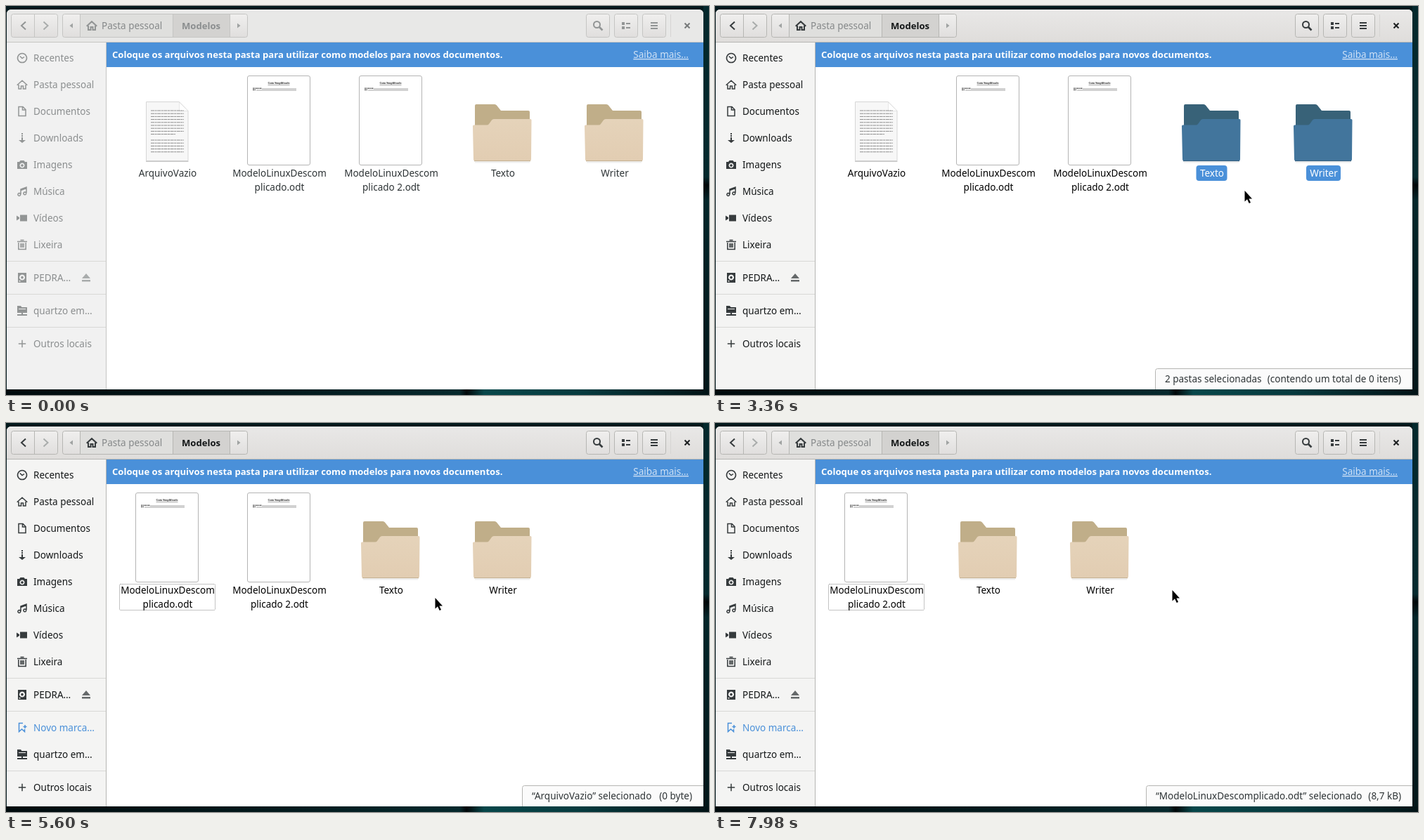
An HTML page for the animation above (8 s loop, 1000 by 554 pixels).

```html
<!DOCTYPE html>
<html lang="pt-BR">
<head>
<meta charset="utf-8">
<title>Modelos</title>
<style>
  html, body { margin: 0; width: 100%; height: 100%; overflow: hidden; background: #021518; }
  svg { display: block; width: 1000px; height: 554px; font: 13.5px "Noto Sans", "Open Sans", sans-serif; }
  text { white-space: pre; }
  .bold { font-weight: 700; font-size: 13.1px; }
  .mid { text-anchor: middle; }
  .end { text-anchor: end; }
  .ink { fill: var(--ink); }
  .glyph { fill: var(--glyph); }
  .line { fill: none; stroke: var(--glyph); stroke-width: 2; }
  .box { fill: url(#button); stroke: var(--edge); }
  .rule { fill: #d8d8d6; }
  .tiny { font: 700 4px "Liberation Serif", serif; text-decoration: underline; }
  .new { --ink: #4a90d9; --glyph: #4a90d9; }
  .off { --ink: #929595; --glyph: #a5a8a8; }
</style>
</head>
<body>
<svg viewBox="0 0 1000 554">
  <defs>
    <linearGradient id="button" x2="0" y2="1">
      <stop stop-color="#f0efee"/><stop offset="1" stop-color="#e0dedd"/>
    </linearGradient>
    <linearGradient id="head" x2="0" y2="1">
      <stop stop-color="#e9e8e7"/><stop offset="1" stop-color="#dfdddb"/>
    </linearGradient>
    <linearGradient id="floor">
      <stop stop-color="#010b0d"/><stop offset=".4" stop-color="#031a1d"/>
      <stop offset=".645" stop-color="#06292d"/><stop offset=".655" stop-color="#010709"/>
      <stop offset=".68" stop-color="#07474a"/><stop offset=".82" stop-color="#063a3e"/>
      <stop offset="1" stop-color="#021316"/>
    </linearGradient>
    <linearGradient id="wall" x2="0" y2="1">
      <stop stop-color="#03282c"/><stop offset=".44" stop-color="#042a2e"/>
      <stop offset=".46" stop-color="#000608"/><stop offset=".5" stop-color="#03262a"/>
      <stop offset="1" stop-color="#021619"/>
    </linearGradient>
    <linearGradient id="front" x2="0" y2="1">
      <stop stop-color="#e5d3ba"/><stop offset="1" stop-color="#e2cdb2"/>
    </linearGradient>
  </defs>
  <rect width="1000" height="554" fill="#02191c"/>
  <rect x="992" width="8" height="554" fill="url(#wall)"/>
  <rect y="546" width="1000" height="8" fill="url(#floor)"/>
  <path d="M1 546V12q0-7 7-7H985q7 0 7 7V546Z" fill="#fff"/>
  <path d="M1 51V12q0-7 7-7H985q7 0 7 7V51Z" fill="#e8e8e7"/>
  <path id="lit" d="M1 51V12q0-7 7-7H985q7 0 7 7V51Z" fill="url(#head)"/>
  <rect x="1" y="51" width="991" height="1" fill="var(--edge)"/>
  <g id="header"></g>
  <rect x="1" y="52" width="141" height="494" fill="var(--side)"/>
  <rect x="142" y="52" width="1" height="494" fill="var(--edge)"/>
  <rect x="143" y="52" width="849" height="35" fill="#4a90d9"/>
  <text x="151" y="74" class="bold" fill="#fff">Coloque os arquivos nesta pasta para utilizar como modelos para novos documentos.</text>
  <text x="971" y="74" class="end" fill="#cfe1f5" text-decoration="underline">Saiba mais…</text>
  <g id="side"></g>
  <g id="view"></g>
</svg>
<script>
const $ = id => document.getElementById(id);
const root = document.documentElement.style;
const LOOP = 8000, BLUE = '#4a90d9';

// 16 x 16 symbolic icons: f = filled, s = stroked
const icons = {
  recent: { s: 'M8 1.5a6.5 6.5 0 1 0 .01 0ZM4.8 5.5 8 8.5 11 6.5' },
  home: { s: 'M.7 8.7 8 2.2l7.3 6.5M3 8v6h3.5v-4h3v4H13V8' },
  doc: { s: 'M3 1.5h6l4 4v9H3ZM8.5 2v4H13' },
  down: { f: 'M7 1h2v2H7ZM7 4h2v2H7ZM7 7h2v4h4l-5 4-5-4h4Z' },
  photo: { f: 'M1 4h3l1.5-2h5L12 4h3v10H1ZM8 5.5a3.5 3.5 0 1 0 .01 0ZM8 7.2a1.8 1.8 0 1 1-.01 0Z' },
  music: { s: 'M6 12V5l8-3v8M6 6.5l8-3M3.8 10.6a1.9 1.9 0 1 0 .01 0ZM11.8 9a1.9 1.9 0 1 0 .01 0Z' },
  video: { f: 'M5 3.5h10v9H5ZM0 4.5 4 7v2l-4 2.5Z' },
  trash: { s: 'M2.8 5v9.5h10.4V5M1 3.6h14M5.5 1.5h5M6 6v6M8 6v6M10 6v6' },
  disk: { f: 'M2 1h12v14H2ZM8 3.5a4 4 0 1 0 .01 0ZM8 5.8a1.8 1.8 0 1 1-.01 0ZM3.5 12v1.5h2V12Z' },
  net: { f: 'M1 1h5l1.5 2H15v8H1ZM3 5v1h10V5ZM7 11h2v2h6v2H1v-2h6Z' },
  plus: { s: 'M8 2.8v10.4M2.8 8h10.4' },
  mark: { s: 'M9 1.5H3.5v12L7.5 10l4 3.5V10M12 4v5M9.5 6.5h5' },
  eject: { f: 'M8 2 14 9H2ZM2 11h12v2.5H2Z' }
};
function icon(name, x, y, thin) {
  const { f, s } = icons[name];
  return `<g transform="translate(${x} ${y})">` + (f
    ? `<path class="glyph" fill-rule="evenodd" d="${f}"/>`
    : `<path class="line" ${thin ? 'style="stroke-width:1.5"' : ''} d="${s}"/>`) + '</g>';
}

const button = (x, w = 34) => `<rect class="box" x="${x + .5}" y="11.5" width="${w - 1}" height="33" rx="3"/>`;
const bar = x => `<rect x="${x}" y="12" width="1" height="33" fill="var(--edge)"/>`;
$('header').innerHTML =
  button(7, 67) + bar(40) + button(80, 264) +
  '<rect x="106" y="12" width="131" height="32" fill="#dfdfdd"/>' +
  '<rect x="238" y="12" width="80" height="32" fill="#d3d2d0"/>' +
  bar(105) + bar(237) + bar(318) +
  '<path class="line" d="M28 22.5 22 28l6 5.5"/>' +
  '<path d="M53.5 22.5 59.5 28l-6 5.5" fill="none" stroke="#a9acab" stroke-width="2"/>' +
  '<path d="M95 24.5v7L90.5 28ZM329 24.5v7l4.5-3.5Z" fill="#a0a3a2"/>' +
  icon('home', 114, 20) +
  '<text x="136" y="33" fill="#858889">Pasta pessoal</text>' +
  '<text x="250" y="33" class="bold ink">Modelos</text>' +
  [825, 865, 905].map(x => button(x)).join('') +
  '<circle class="line" cx="840.5" cy="26.5" r="4.5"/><path class="line" style="stroke-width:2.6" d="m844 30 4.5 4.5"/>' +
  '<path class="glyph" d="M876 23h4v4h-4ZM876 29h4v4h-4ZM882 24h6v2h-6ZM882 30h6v2h-6ZM917 23h10v2h-10ZM917 27h10v2h-10ZM917 31h10v2h-10Z"/>' +
  '<rect x="945" y="12" width="1" height="32" fill="#d6d5d3"/>' +
  '<path d="m965.5 24.5 7 7m0-7-7 7" fill="none" stroke="var(--close)" stroke-width="2"/>';

const places = [['recent', 'Recentes'], ['home', 'Pasta pessoal'], ['doc', 'Documentos'], ['down', 'Downloads'],
  ['photo', 'Imagens'], ['music', 'Música'], ['video', 'Vídeos'], ['trash', 'Lixeira']];
const row = ([pic, label], y, kind = '') =>
  `<g class="${kind}">${icon(pic, 15, y - 8, true)}<text class="ink" x="39" y="${y + 5}">${label}</text></g>`;
const rule = y => `<rect class="rule" x="1" y="${y}" width="141" height="1"/>`;
function sidebar(dragging, marked) {
  const d = marked ? 38 : 0;
  return places.map((p, i) => row(p, 74 + 38 * i, dragging && !i ? 'off' : '')).join('') +
    rule(363) + row(['disk', 'PEDRA…'], 387) + `<g opacity=".75">${icon('eject', 106, 379)}</g>` + rule(410) +
    (marked ? row(['mark', 'Novo marca…'], 434, 'new') : '') +
    row(['net', 'quartzo em…'], 434 + d) + rule(457 + d) + row(['plus', 'Outros locais'], 481 + d);
}

// Pictures are drawn in the first slot and moved from there
function note(sel, hot) {
  let rows = '';
  for (let y = 149; y < 210; y += 4.2)
    if (Math.abs(y - 186.8) > 1) rows += `M206 ${y}h${y > 180 && y < 185 ? 35 : 47}`;
  return `<path d="M199.5 136.5h47l12.5 13v71h-59.5Z" fill="${sel ? BLUE : hot ? '#fff' : '#f7f7f7'}" stroke="${sel ? '#3d78b5' : hot ? '#e9e9e9' : '#d6d6d6'}"/>
    <path d="M199 221.3h60.5" stroke="${hot ? '#ddd' : '#bbb'}"/>
    <path d="M246.5 137v12.5H259Z" fill="${sel ? '#78aee5' : '#fff'}" stroke="${hot ? '#eee' : '#ddd'}" stroke-width=".7"/>
    <path d="${rows}" stroke="${sel ? '#2d5782' : hot ? '#e6e6e6' : '#8d8d8d'}" stroke-dasharray="5 .6 3 .6" stroke-width="${hot ? .8 : 1}" fill="none"/>`;
}
function sheet(sel) {
  const dark = sel ? '#15304b' : '#222';
  return `<rect x="184.5" y="99.5" width="89" height="127" rx="2.5" fill="${sel ? BLUE : '#fff'}" stroke="${sel ? '#3a74b0' : '#b4b4b4'}"/>
    <text class="tiny mid" x="229" y="111" fill="${dark}">Guia Simplificado</text>
    <path d="M192 117.2h13M192 119.4h4" stroke="${dark}" stroke-width="1" stroke-dasharray="2 .5"/>
    <path d="M205 118h49M197 120h57" stroke="${dark}" stroke-width=".6" opacity=".7"/>`;
}
function folder(sel, hot) {
  return `<path d="M190 170v-28q0-2 2-2h26q2 0 3 1.5l6 7.5h39q2 0 2 2v20Z" fill="${sel ? '#386278' : hot ? '#cbb994' : '#c0ae89'}"/>
    <path d="M187 171q0-1.5 1.5-1.5H207q2 0 3-1.5l4-5.5q1-1.5 3-1.5h52q1.500 0 1.500 1.500l-.5 56q0 2-2 2H190q-2 0-2-2Z" fill="${sel ? '#42759c' : 'url(#front)'}"/>
    <path d="M189 220.600h80" stroke="${sel ? '#365f80' : '#c5b293'}" stroke-width="1.200"/><path d="M190 222.500h78" stroke="#eee" stroke-width="2"/>`;
}
const files = {
  empty: { draw: note, lines: ['ArquivoVazio'], half: 46 },
  one: { draw: sheet, lines: ['ModeloLinuxDescom', 'plicado.odt'], half: 70.5 },
  two: { draw: sheet, lines: ['ModeloLinuxDescom', 'plicado 2.odt'], half: 70.5 },
  text: { draw: folder, lines: ['Texto'], half: 22 },
  writer: { draw: folder, lines: ['Writer'], half: 24.5 }
};
function item(id, x, y, { sel, hot, focus, ink = '#000' }) {
  const { draw, lines, half } = files[id], h = lines.length * 20 + 2;
  const frame = (inset, attrs) =>
    `<rect x="${229.5 - half + inset}" y="${227 + inset}" width="${half * 2 - inset * 2}" height="${h - inset * 2}" ${attrs}/>`;
  return `<g transform="translate(${x} ${y})">${draw(sel, hot)}` +
    (sel ? frame(0, `rx="4" fill="${BLUE}"`) : '') +
    (focus ? frame(2.5, `rx="1.500" fill="none" stroke="${sel ? '#94bfea' : '#888'}" stroke-dasharray="1 1"`) : '') +
    lines.map((s, i) => `<text class="mid" x="230" y="${243 + 20 * i}" fill="${sel ? '#fff' : ink}">${s}</text>`).join('') + '</g>';
}

function status(x, left, right) {
  return `<path d="M${x + .5} 546V519.500q0-3 3-3H992V546Z" fill="#fbfbfb"/>
    <path d="M${x + .5} 546V519.500q0-3 3-3H992" fill="none" stroke="#b6b6b3"/>
    <text x="${x + 14}" y="536" fill="#2e3436">${left}</text><text class="end" x="976" y="536" fill="#2e3436">${right}</text>`;
}

// Pointer way points: time, x, y
const track = [
  [350, 502, 14], [560, 541, 130], [770, 580, 290], [910, 561, 336], [1400, 561, 336],
  [1820, 700, 325], [2240, 889, 281], [2380, 862, 268], [2660, 722, 194], [2800, 704, 180],
  [2940, 704, 180], [3220, 725, 240], [3500, 780, 286], [3710, 780, 286],
  [4060, 440, 262], [4270, 252, 230], [4550, 235, 185], [4620, 238, 186],
  [4970, 450, 225], [5320, 690, 195], [5390, 690, 195], [5600, 610, 249],
  [5950, 400, 215], [6230, 247, 180], [6300, 250, 181], [6720, 420, 210], [7070, 603, 235],
  [7210, 728, 256], [7280, 757, 288], [7350, 752, 302], [7490, 744, 240], [7630, 739, 173],
  [7700, 739, 173], [7980, 650, 238]
];
function pointer(t) {
  let i = track.findIndex(p => p[0] > t) - 1;
  if (i < 0) i = track.length - 2;
  const [a, b] = [track[i], track[i + 1]];
  const k = Math.min(1, (t - a[0]) / (b[0] - a[0]));
  return [1, 2].map(n => Math.round(a[n] + (b[n] - a[n]) * k));
}
const arrow = `<path d="M.5 0v15.500l3.500-3.200 2.700 5.700 2.300-1-2.600-5.500H11Z" fill="#000" stroke="#fff" stroke-width="1" paint-order="stroke"/>`;
const fist = `<g transform="translate(-5 -3)"><path d="M1 4Q1 1 3 1.300 4 0 5.500.800 7 .200 8 1.600 10 1.500 10 4v3L9 9.500H3L.5 6Z" fill="#000" stroke="#fff" paint-order="stroke"/>
  <path d="M7 9h8l-2.500 2.500 4 4-2 2-4-4L7 17Z" fill="#fff" stroke="#000"/></g>`;

const within = (t, a, b) => t >= a && t < b;
const mix = (a, b, k) => `rgb(${a.map((v, i) => Math.round(v + (b[i] - v) * k))})`;

function view(t) {
  const [x, y] = pointer(t);
  const drag = within(t, 4620, 5460) ? 'empty' : within(t, 6300, 7770) ? 'one' : '';
  const grab = drag === 'empty' ? [235, 185] : [247, 180];
  const list = Object.keys(files).slice(t < 5600 ? 0 : t < 7910 ? 1 : 2);
  const banded = within(t, 2310, 3080);
  // The band trails the pointer slightly
  const [bx, by] = t < 2800 ? pointer(t - 15).map((v, i) => v + [0, 1][i]) : [x, y];
  const chosen = id =>
    id === 'writer' ? within(t, 2380, 3640) :
    id === 'text' ? within(t, 2660, 3640) :
    id === 'empty' ? within(t, 4550, 5600) :
    id === 'one' && within(t, 6230, 7910);

  let out = list.map((id, i) => {
    const sel = chosen(id), px = x - 159 * i;
    const hot = t >= 350 && !sel && !drag && Math.abs(px - 229) < 46 && within(y, 136, 250);
    const focus = i === 0 && (sel || t >= 5600);
    return item(id, 159 * i, 0, { sel, hot, focus, ink: t < 1330 ? '#2e3436' : '#000' });
  }).join('');

  if (banded) out += `<rect x="${bx + .5}" y="${by + .5}" width="${888 - bx}" height="${280 - by}" fill="${BLUE}" fill-opacity=".24" stroke="#2a76c6"/>`;
  if (within(t, 2730, 3780)) out += status(626, '2 pastas selecionadas', '(contendo um total de 0 itens)');
  else if (within(t, 4690, 6300)) out += status(734, '“ArquivoVazio” selecionado', '(0 byte)');
  else if (t >= 6300) out += status(613, '“ModeloLinuxDescomplicado.odt” selecionado', '(8,7 kB)');

  if (drag) out += item(drag, x - grab[0], y - grab[1], { sel: true, focus: true });
  if (t >= 350) out += `<g transform="translate(${x} ${y})">${drag ? fist : arrow}</g>`;
  return out;
}

function render(t) {
  const k = t < 1330 ? 0 : Math.min(1, .5 + (t - 1330) / 420);
  root.setProperty('--ink', mix([139, 142, 143], [20, 23, 24], k));
  root.setProperty('--glyph', mix([146, 149, 149], [54, 59, 61], k));
  root.setProperty('--edge', mix([197, 197, 195], [182, 182, 179], k));
  root.setProperty('--side', mix([241, 241, 241], [244, 244, 243], k));
  root.setProperty('--close', t < 1330 ? '#777a7a' : '#1c1f20');
  $('lit').setAttribute('opacity', k);
  $('side').innerHTML = sidebar(within(t, 4690, 5530) || within(t, 6370, 7840), t >= 4690);
  $('view').innerHTML = view(t);
}

let last = -1;
function tick(now) {
  const t = now % LOOP;
  const step = t < 350 ? 0 : 350 + 70 * Math.floor((t - 350) / 70);
  if (step !== last) render(last = step);
  requestAnimationFrame(tick);
}
tick(performance.now());
</script>
</body>
</html>
```
